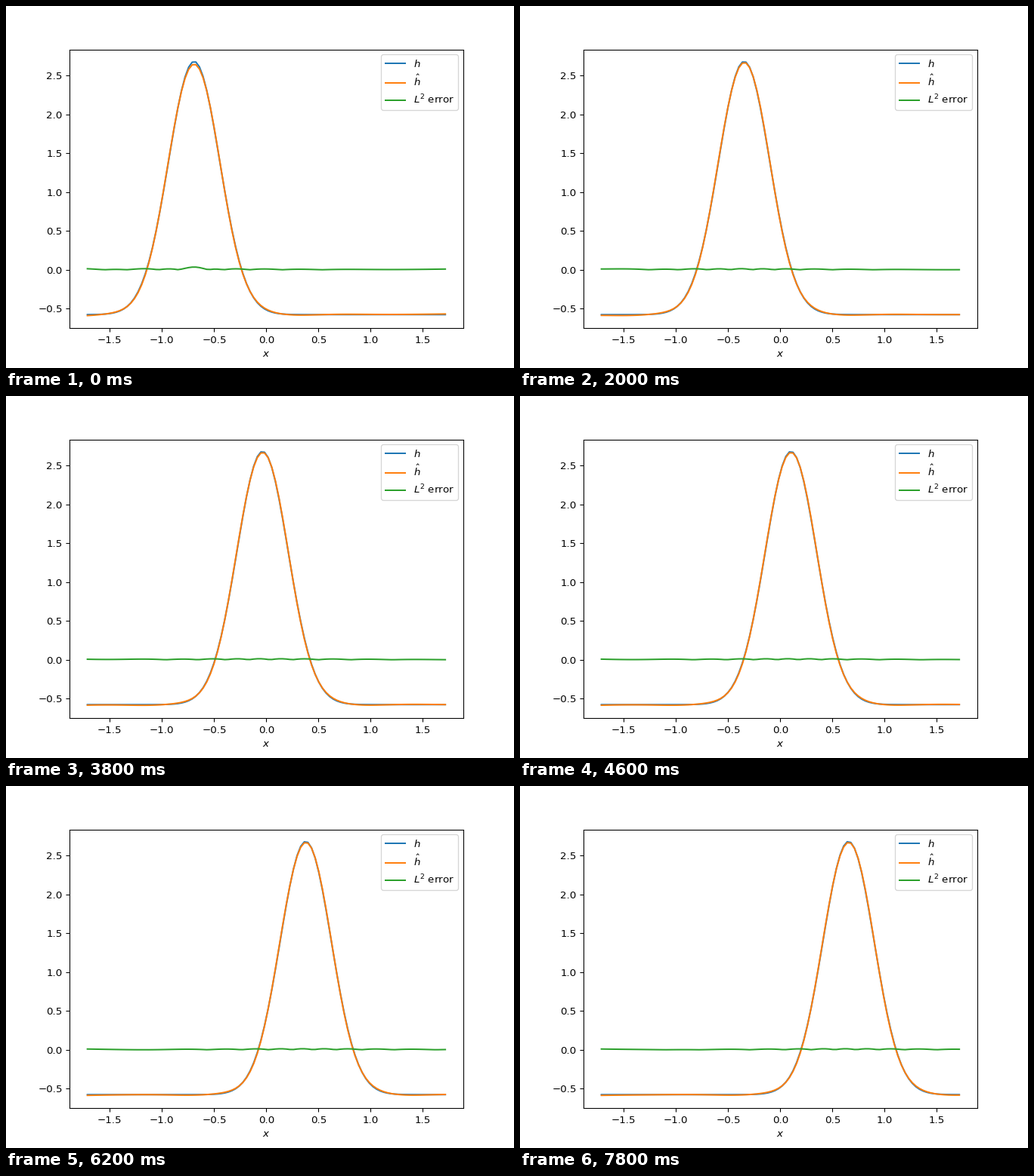
A matplotlib script for the animation above (8000 ms loop, 672 by 480 pixels).

```python
import numpy as np
import matplotlib.pyplot as plt
from matplotlib.animation import FuncAnimation

FRAMES, INTERVAL = 40, 200
POINTS = 100
SIGMA = 0.245
HEIGHT, BASE = 3.263, -0.5785
START, SPEED = -0.692, 0.0345

edge = np.sqrt(3 * (POINTS - 1) / (POINTS + 1))
x = np.linspace(-edge, edge, POINTS)


def gauss(u, width):
    return np.exp(-((u / width) ** 2))


def offset(i):
    return x - START - SPEED * i


def bump(i):
    return BASE + HEIGHT * gauss(offset(i), SIGMA * np.sqrt(2))


def residual(i):
    """Ripple that travels with the bump and widens away from it."""
    u = offset(i)
    phase = np.pi * (np.arcsinh(u / 0.6) + 0.22) / 0.34
    ripple = -0.013 * gauss(u, 1.3) * np.sin(phase)
    crest = -0.024 * np.exp(-i / 3) * gauss(u - 0.03, 0.12)
    left = -0.009 * np.exp(-(x + edge) / 0.4)
    right = 0.009 * np.exp(-i / 6) * np.exp((x - edge) / 0.5)
    return ripple + crest + left + right


fig, ax = plt.subplots(figsize=(7, 5), dpi=96)
true_line, = ax.plot(x, bump(0), label=r"$h$")
fit_line, = ax.plot(x, bump(0), label=r"$\hat{h}$")
error_line, = ax.plot(x, 0 * x, label=r"$L^2$ error")
ax.set_xlim(-1.1 * edge, 1.1 * edge)
ax.set_ylim(-0.753, 2.839)
ax.set_xlabel(r"$x$")
ax.legend(loc="upper right")


def update(i):
    h, e = bump(i), residual(i)
    true_line.set_ydata(h)
    fit_line.set_ydata(h + e)
    error_line.set_ydata(np.abs(e))
    return true_line, fit_line, error_line


anim = FuncAnimation(fig, update, frames=FRAMES, interval=INTERVAL,
                     init_func=lambda: update(0), repeat=True, repeat_delay=0)
plt.show()
```
